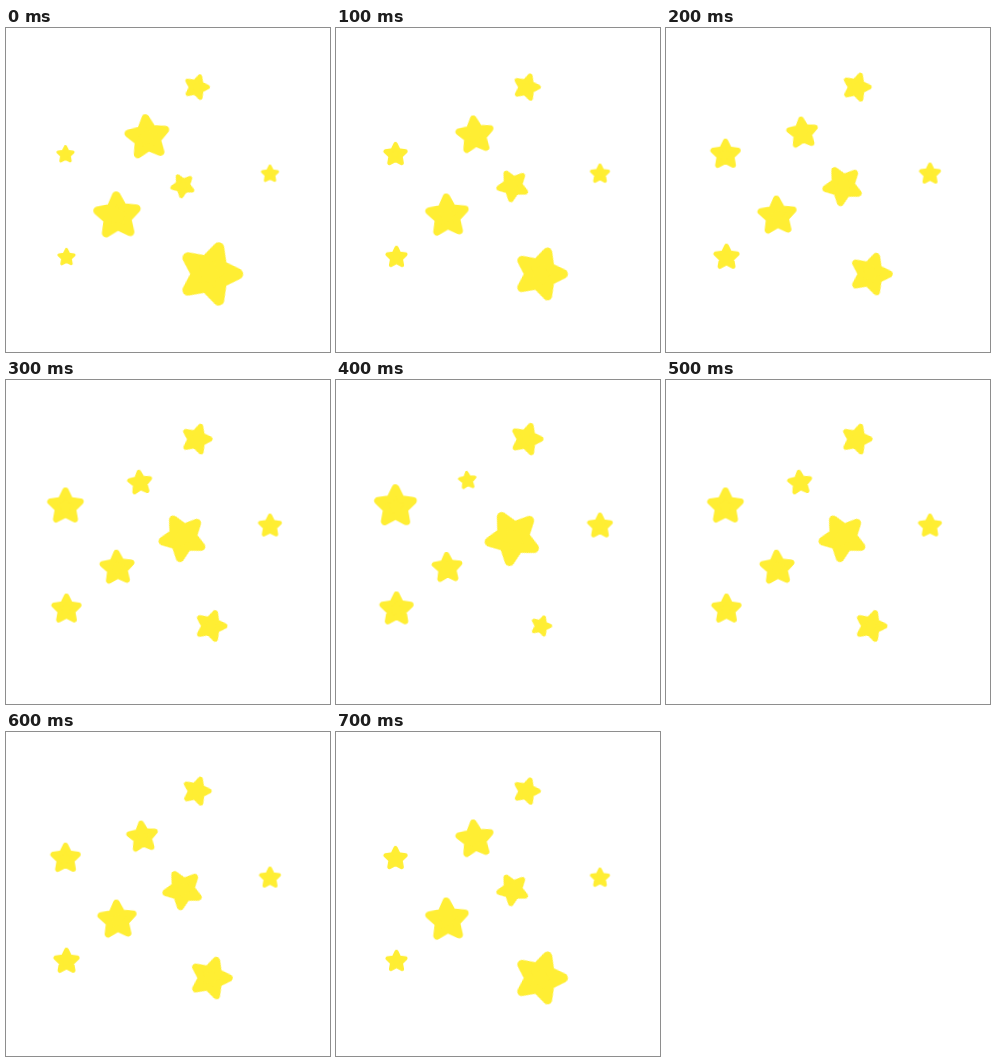
These frames come from a looping animation (324 by 324 pixels, 0.8 s). An HTML page:

```html
<!DOCTYPE html>
<html lang="en">
<head>
<meta charset="utf-8">
<title>Twinkling stars</title>
<style>
  html, body { margin: 0; width: 100%; height: 100%; overflow: hidden; background: #fff; }
  svg { display: block; width: 100vw; height: 100vh; }
  path {
    fill: #ffee33;
    stroke: #ffee33;
    stroke-linejoin: round;
    animation: pulse 800ms steps(4, end) infinite;
  }
  @keyframes pulse {
    0%, 100% { transform: rotate(var(--lean)) scale(var(--r0)); }
    50% { transform: translate(var(--dx), var(--dy)) rotate(var(--lean)) scale(var(--r1)); }
  }
</style>
</head>
<body>
<svg id="sky" viewBox="0 0 324 324"></svg>
<script>
  const NS = 'http://www.w3.org/2000/svg';
  const sky = document.getElementById('sky');
  const EDGE = 0.17;   // rounding of a star with radius 1
  const NOTCH = 0.6;   // inner radius

  // One five-pointed outline; the round stroke fills it out to radius 1.
  const outline = 'M' + Array.from({ length: 10 }, (_, i) => {
    const angle = i * Math.PI / 5;
    const r = i % 2 ? NOTCH - EDGE * 1.1 : 1 - EDGE;
    return `${(r * Math.sin(angle)).toFixed(3)} ${(-r * Math.cos(angle)).toFixed(3)}`;
  }).join('L') + 'Z';

  // Centre, lean in degrees, radius at the start and half-way, optional drift.
  function addStar(x, y, lean, r0, r1, dx = 0, dy = 0) {
    const group = document.createElementNS(NS, 'g');
    const path = document.createElementNS(NS, 'path');
    group.setAttribute('transform', `translate(${x} ${y})`);
    path.setAttribute('d', outline);
    path.setAttribute('stroke-width', 2 * EDGE);
    const vars = { lean: lean + 'deg', r0, r1, dx: dx + 'px', dy: dy + 'px' };
    for (const name in vars) path.style.setProperty('--' + name, vars[name]);
    group.append(path);
    sky.append(group);
  }

  addStar(204.2, 246, 18, 33, 11, 1);
  addStar(141.5, 109.5, -6, 23.3, 9.6, -10, -9);
  addStar(111.3, 188, -3, 24.7, 16);
  addStar(176.8, 157.7, -28, 12.6, 28.5);
  addStar(59.5, 126.5, 0, 9.4, 22.2);
  addStar(60.5, 229.3, 0, 9.4, 17.8);
  addStar(264, 146, 0, 9.4, 13.4);
  addStar(190.7, 59.2, 17, 13.3, 16.8);
</script>
</body>
</html>
```
